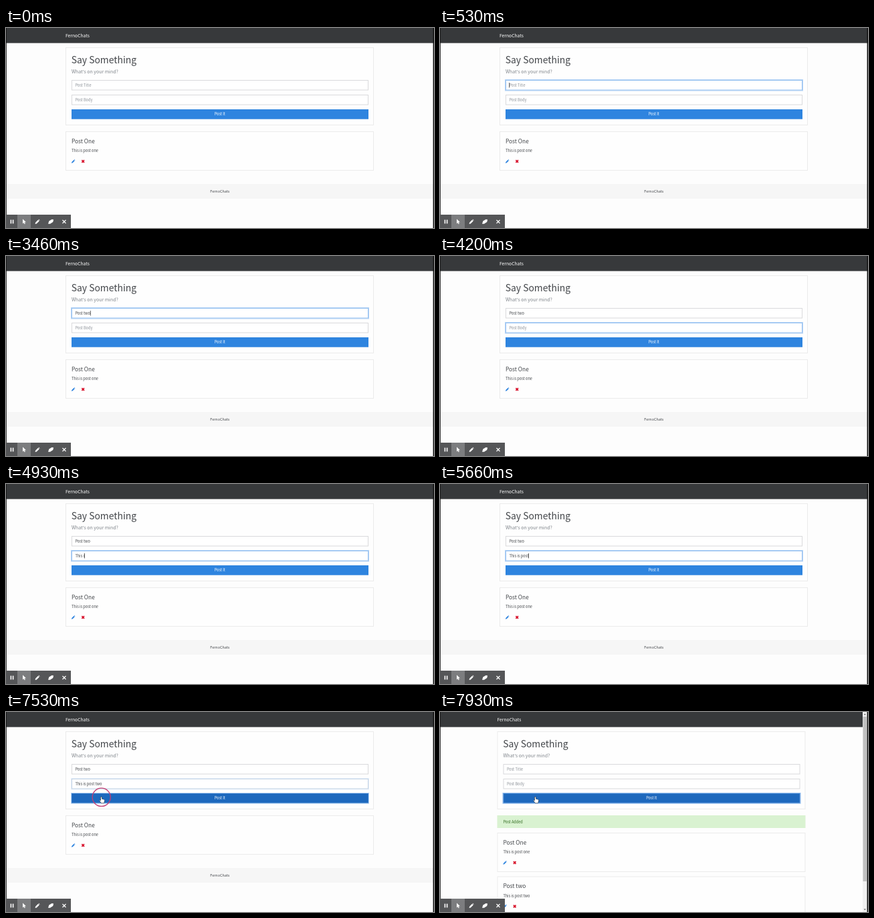
An HTML page with a canvas for the animation above (8000 ms loop, 640 px wide and 300 px high).

```html
<!DOCTYPE html>
<html lang="en">
<head>
<meta charset="utf-8">
<style>
  html, body { margin: 0; width: 100%; height: 100%; overflow: hidden; background: #fdfdfd; }
  canvas { display: block; width: 640px; height: 300px; }
</style>
</head>
<body>
<canvas id="stage" width="640" height="300"></canvas>
<script>
const ctx = document.getElementById('stage').getContext('2d');
const LOOP = 8000;
const FAMILY = '"Noto Sans CJK SC", "Noto Sans CJK JP", "Noto Sans CJK KR", "Noto Sans CJK TC", "Open Sans", sans-serif';
const BRAND = 'FernoChats';
const INK = '#43464a', MUTED = '#8b9097', BLUE = '#2e84df', DEEP_BLUE = '#1d68bd';

const TITLE = { text: 'Post two', hint: 'Post Title', y: 78, focus: 330, blur: 3660,
  keys: [1330, 1460, 1660, 1800, 2000, 2130, 2260, 2400] };
const BODY = { text: 'This is post two', hint: 'Post Body', y: 100, focus: 3660, blur: 7430,
  keys: Array.from({ length: 16 }, (_, i) => 4330 + i * 118) };
const MOVE_START = 6700, MOVE_END = 7260, CLICK = 7430, RELEASE = 7660, POSTED = 7730;

const clamp = v => Math.max(0, Math.min(1, v));
const ramp = (t, start, length = 150) => clamp((t - start) / length);
const smooth = v => v * v * (3 - 2 * v);
const mix = (a, b, k) => a + (b - a) * k;
const blend = (a, b, k) => `rgb(${a.map((v, i) => Math.round(mix(v, b[i], k)))})`;

function box(x, y, w, h, color) {
  ctx.fillStyle = color;
  ctx.fillRect(x, y, w, h);
}

function frame(x, y, w, h, color, line = 1) {
  ctx.strokeStyle = color;
  ctx.lineWidth = line;
  ctx.strokeRect(x + line / 2, y + line / 2, w - line, h - line);
}

function text(str, x, y, size, color, weight = 400, align = 'left') {
  ctx.font = `${weight} ${size}px ${FAMILY}`;
  ctx.textAlign = align;
  ctx.fillStyle = color;
  ctx.fillText(str, x, y);
}

function shape(points, fill, stroke, line = 1) {
  ctx.beginPath();
  points.forEach(([x, y]) => ctx.lineTo(x, y));
  ctx.closePath();
  if (stroke) {
    ctx.strokeStyle = stroke;
    ctx.lineWidth = line;
    ctx.lineJoin = 'round';
    ctx.stroke();
  }
  ctx.fillStyle = fill;
  ctx.fill();
}

function cross(x, y, r, color, line) {
  ctx.beginPath();
  ctx.moveTo(x - r, y - r); ctx.lineTo(x + r, y + r);
  ctx.moveTo(x + r, y - r); ctx.lineTo(x - r, y + r);
  ctx.strokeStyle = color;
  ctx.lineWidth = line;
  ctx.stroke();
}

function pencil(x, y, size, color) {
  ctx.save();
  ctx.translate(x, y);
  ctx.scale(size, size);
  shape([[-3, 3], [-2.5, 1], [0.9, -2.4], [2.4, -0.9], [-1, 2.5]], color);
  shape([[1.3, -2.8], [1.9, -3.2], [3.1, -2], [2.8, -1.3]], color);
  ctx.restore();
}

function focusRing(x, y, w, h, amount) {
  if (amount > 0) frame(x - 1, y - 1, w + 2, h + 2, `rgba(70,145,230,${0.4 * amount})`, 1);
}

function field(f, t) {
  const cleared = t >= POSTED;
  const focus = ramp(t, f.focus) * (1 - ramp(t, f.blur));
  const typed = cleared ? '' : f.text.slice(0, f.keys.filter(k => k <= t).length);
  box(98, f.y, 444, 15.5, '#fff');
  frame(98, f.y, 444, 15.5, blend([217, 218, 220], [150, 193, 240], focus));
  focusRing(98, f.y, 444, 15.5, focus);
  const base = f.y + 10;
  text(typed || f.hint, 103.4, base, 5.57, typed ? INK : MUTED);

  if (t < f.focus || t >= f.blur) return;
  const lastKey = Math.max(f.focus, ...f.keys.filter(k => k <= t));
  if (Math.floor((t - lastKey) / 530) % 2 === 0) {
    const width = typed ? ctx.measureText(typed).width : 0;
    box(103.4 + width, f.y + 4, 0.7, 7.5, '#222');
  }
}

function button(t) {
  const hover = ramp(t, 7130), ring = ramp(t, CLICK);
  box(98, 122, 444, 14.7, blend([46, 132, 223], [29, 104, 189], hover));
  if (ring > 0) {
    frame(97, 121, 446, 16.7, `rgba(80,150,230,${0.6 * ring})`);
    frame(98, 122, 444, 14.7, `rgba(120,175,235,${0.35 * ring})`);
  }
  text('Post It', 319.8, 131.4, 5.57, '#fff', 400, 'center');
}

function card(y, h) {
  box(89, y, 461, h, '#fefefe');
  frame(89, y, 461, h, '#ebebeb');
}

function post(y, title, body) {
  card(y, 59);
  text(title, 97.9, y + 17.6, 8.4, INK, 300);
  text(body, 97.9, y + 31.2, 5.57, INK);
  pencil(100.6, y + 45, 0.9, BLUE);
  cross(115.2, y + 45, 1.8, '#d8102a', 1.7);
}

function page(t) {
  const posted = t >= POSTED;
  ctx.save();
  if (posted) ctx.translate(-3.5, 0);
  text(BRAND, 89, 14.2, 6.75, '#fff', 500);
  card(29, 117);
  text('Say Something', 97.7, 52.6, 13.9, INK, 300);
  text("What's on your mind?", 97.9, 68.4, 6.97, '#80868c', 300);
  field(TITLE, t);
  field(BODY, t);
  button(t);
  if (posted) {
    box(89, 155, 461, 19, '#d9f2d1');
    text('Post Added', 97.9, 166.7, 5.57, '#2f6a1e');
    post(181, TITLE.text.replace('two', 'One'), 'This is post one');
    post(246.5, TITLE.text, BODY.text);
  } else {
    post(155, 'Post One', 'This is post one');
    box(0, 234, 639, 22, '#f6f6f6');
    text(BRAND, 319.8, 247.2, 5.45, INK, 400, 'center');
  }
  ctx.restore();
}

function scrollbar() {
  box(632, 0, 7, 300, '#f1f1f1');
  box(632.5, 7, 5.5, 247, '#c1c1c1');
  shape([[633.7, 4.3], [635.3, 2.5], [636.9, 4.3]], '#555');
  shape([[633.7, 295.5], [635.3, 297.3], [636.9, 295.5]], '#555');
}

function toolbar() {
  box(0, 280, 97, 20, '#555658');
  box(17, 280, 20, 20, '#7c7d7f');
  box(6.6, 287.6, 1.6, 5.8, '#fff');
  box(9.8, 287.6, 1.6, 5.8, '#fff');
  arrow(25, 286.6, 0.85);
  pencil(47, 290.5, 1.15, '#fff');
  shape([[63, 293.8], [64.4, 289.6], [68.6, 287], [71.2, 287.4], [70.2, 291], [66, 293.8]], '#fff');
  cross(87, 290.5, 2.5, '#fff', 1.2);
}

function arrow(x, y, size, outline) {
  ctx.save();
  ctx.translate(x, y);
  ctx.scale(size, size);
  shape([[0, 0], [0, 8], [1.9, 6.3], [3.1, 9], [4.5, 8.4], [3.3, 5.8], [5.8, 5.6]], '#fff', outline, 1);
  ctx.restore();
}

function hand(x, y) {
  ctx.save();
  ctx.translate(x, y);
  shape([[-0.6, 0], [0.7, 0], [1, 3.4], [4.4, 4.2], [5, 5.2], [4.4, 7.6], [3.8, 9.2],
    [0.2, 9.2], [-2.4, 5.6], [-1.8, 4.8], [-0.6, 5.8]], '#fff', '#222', 1);
  ctx.restore();
}

function pointer(t) {
  if (t < MOVE_START) return;
  const k = smooth(ramp(t, MOVE_START, MOVE_END - MOVE_START));
  const x = mix(168, 142.4, k), y = mix(176, 127.4, k);
  if (y < 137) hand(x, y);
  else arrow(x, y, 0.9, '#222');
  if (t >= CLICK && t < RELEASE) {
    ctx.beginPath();
    ctx.arc(142.7, 127.8, mix(9, 13.6, ramp(t, CLICK, 90)), 0, Math.PI * 2);
    ctx.strokeStyle = '#c43d72';
    ctx.lineWidth = 1.3;
    ctx.stroke();
  }
}

function draw(t) {
  box(0, 0, 640, 300, '#fdfdfd');
  box(0, 0, 640, 22.6, '#37393b');
  page(t);
  if (t >= POSTED) scrollbar();
  box(0, 0, 0.8, 300, '#111');
  box(638.6, 0, 1.4, 300, '#111');
  toolbar();
  pointer(t);
}

const start = performance.now();
function tick() {
  draw((performance.now() - start) % LOOP);
  requestAnimationFrame(tick);
}
tick();
</script>
</body>
</html>
```
